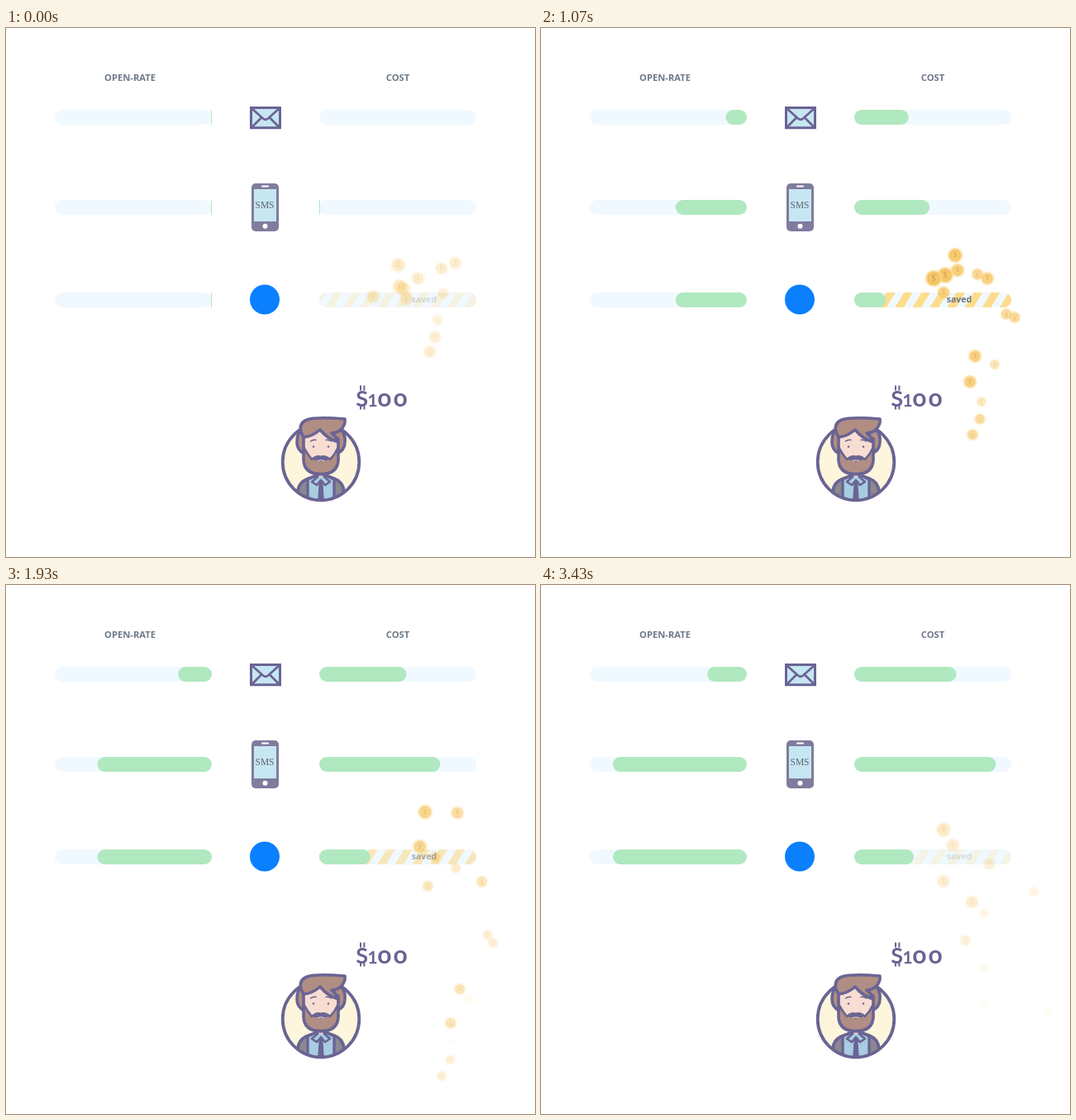
These frames come from a looping animation (640x640 px, 3460 ms). An HTML page with a canvas:

```html
<!DOCTYPE html>
<html lang="en">
<head>
<meta charset="utf-8">
<title>Open rate and cost</title>
<style>
  html, body { margin: 0; width: 100%; height: 100%; overflow: hidden; background: #fff; }
  canvas { display: block; width: 640px; height: 640px; }
</style>
</head>
<body>
<canvas id="stage" width="640" height="640"></canvas>
<script>
const ctx = document.getElementById('stage').getContext('2d');
const LOOP = 3460;
const INK = '#6a6494', BLUE = '#c6e7f1', TRACK = '#f0f9ff', GREEN = '#b0e8bf';
const HAIR = '#b18e83', SKIN = '#f8ddd2', GREY = '#8a8890', SHIRT = '#a8cce1';
const BAR_W = 190, BAR_H = 18, LEFT_END = 249, RIGHT_START = 379;

// top, open-rate share, cost share
const ROWS = [[99, 0.252, 0.65], [208, 0.853, 0.902], [320, 0.853, 0.379]];

// Bursts of coins: time of the listed state, birth time, rows of [x, y, vx, vy, strength]
const BURSTS = [
  [1070, -1e4, [
    [522, 492, 7, 109, .4], [531, 473, 9, 108, .35], [533, 452, 8, 108, .2],
    [549, 407, 15, 98, .25], [519, 428, 26, 109, .6], [525, 397, 33, 95, .6],
    [563, 346, 27, 75, .4], [573, 350, 22, 83, .4], [528, 298, 22, 30, .45],
    [540, 303, 49, 46, .6], [504, 293, 21, 19, .65], [487, 320, 32, 30, .55]]],
  [1070, 820, [
    [501, 275, 62, -30, .8], [489, 299, 16, -7, .95], [475, 303, 44, -70, 1]]],
  [2270, 1950, [
    [501, 297, 38, 65, .55], [472, 306, 16, 14, .9], [490, 307, 34, 40, .9]]],
  [3430, 3050, [[487, 296, 25, -10, .9], [498, 315, 20, 15, .7]]]
];

function ease(p) {
  let lo = 0, hi = 1;
  const bez = (s, a, b) => 3 * (1 - s) * (1 - s) * s * a + 3 * (1 - s) * s * s * b + s * s * s;
  for (let i = 0; i < 24; i++) {
    const mid = (lo + hi) / 2;
    if (bez(mid, .25, .25) < p) lo = mid; else hi = mid;
  }
  return bez(lo, .1, 1);
}

function paint(fill, stroke, width) {
  if (fill) { ctx.fillStyle = fill; ctx.fill(); }
  if (stroke) { ctx.strokeStyle = stroke; ctx.lineWidth = width; ctx.stroke(); }
}

function pill(x, y, w, h, r, fill, stroke, width) {
  ctx.beginPath();
  ctx.roundRect(x, y, w, h, Math.min(r, w / 2));
  paint(fill, stroke, width);
}

function disc(x, y, r, fill, stroke, width) {
  ctx.beginPath();
  ctx.arc(x, y, r, 0, 2 * Math.PI);
  paint(fill, stroke, width);
}

function shape(d, fill, stroke, width) {
  const path = new Path2D(d);
  if (fill) { ctx.fillStyle = fill; ctx.fill(path); }
  if (stroke) { ctx.strokeStyle = stroke; ctx.lineWidth = width; ctx.stroke(path); }
}

function label(text, x, y, font, color, align = 'center') {
  ctx.font = font;
  ctx.fillStyle = color;
  ctx.textAlign = align;
  ctx.fillText(text, x, y);
}

function stripes(alpha) {
  const top = ROWS[2][0], lean = 11, width = 10.5;
  ctx.save();
  ctx.globalAlpha = alpha;
  ctx.beginPath();
  ctx.roundRect(RIGHT_START, top, BAR_W, BAR_H, 9);
  ctx.clip();
  ctx.beginPath();
  for (let x = 365; x < 580; x += 21.1) {
    ctx.moveTo(x, top + BAR_H);
    ctx.lineTo(x + lean, top);
    ctx.lineTo(x + lean + width, top);
    ctx.lineTo(x + width, top + BAR_H);
    ctx.closePath();
  }
  paint('#fedc8c');
  ctx.restore();
}

function bars(t, glow) {
  const grown = ease(t / LOOP) * BAR_W;
  for (const [y] of ROWS) {
    pill(59, y, BAR_W, BAR_H, 9, TRACK);
    pill(RIGHT_START, y, BAR_W, BAR_H, 9, TRACK);
  }
  stripes(glow);
  for (const [y, rate, cost] of ROWS) {
    const open = Math.max(1, grown * rate);
    const paid = Math.max(cost > .8 ? 1 : 0, grown * cost);
    pill(LEFT_END - open, y, open, BAR_H, 9, GREEN);
    if (paid > 0) pill(RIGHT_START, y, paid, BAR_H, 9, GREEN);
  }
}

function coin(x, y, strength, alpha) {
  const r = 6 + 4 * strength;
  ctx.globalAlpha = alpha * .4;
  disc(x, y, r + .8, '#fde3a6');
  ctx.globalAlpha = alpha;
  disc(x, y, r - .6, '#fbd27a');
  disc(x, y, r * .64, '#f9cb6c', '#ecb65a', 1.1);
  label('$', x, y + r * .34, `bold ${r}px "Open Sans", sans-serif`, '#dfa750');
}

function coins(t, glow) {
  const drag = .4, fallSpeed = 170;
  ctx.save();
  for (const [at, born, list] of BURSTS) {
    const fadeIn = Math.min(1, (t - born) / 200);
    if (fadeIn <= 0) continue;
    const dt = (t - at) / 1000;
    const slowed = (1 - Math.exp(-drag * dt)) / drag;
    for (const [x, y, vx, vy, start] of list) {
      const strength = Math.min(1, start - .2 * dt);
      if (strength <= 0) continue;
      coin(x + vx * slowed, y + fallSpeed * dt + (vy - fallSpeed) * slowed,
        strength, strength * fadeIn * glow);
    }
  }
  ctx.restore();
}

function envelope() {
  ctx.lineJoin = 'miter';
  shape('M296.5 96.5H331.5V120.8H296.5Z', BLUE, INK, 3);
  ctx.lineJoin = 'round';
  shape('M297 97L311 109.5Q314 112 317 109.5L331 97M297 120.5L309 108.5M331 120.5L319 108.5', null, INK, 2.7);
}

function phone() {
  pill(297, 188, 33, 58, 5, '#7f7c9e');
  ctx.fillStyle = BLUE;
  ctx.fillRect(300, 195, 27, 39);
  pill(309, 190.6, 9, 1.8, 1, '#fff');
  disc(313.5, 239.7, 3, '#fff');
  label('SMS', 313, 218, '11.5px "Liberation Serif", serif', '#5f6276');
}

function avatar() {
  ctx.save();
  ctx.lineJoin = ctx.lineCap = 'round';
  disc(381, 525, 46.3, '#fdf5dc');
  ctx.save();
  ctx.beginPath();
  ctx.arc(381, 525, 46.3, 0, 2 * Math.PI);
  ctx.clip();
  shape('M353 576V561Q354 549 366 545L377 541H386L397 545Q408 549 409 561V576Z', GREY, INK, 3.6);
  shape('M365 576V546L377 541H386L397 546V576Z', SHIRT, INK, 3.4);
  shape('M377 537H385V543L381 547L377 543Z', SKIN, INK, 2.6);
  shape('M377 543L370 549L376 553L381 547L386 553L392 549L385 543', SHIRT, INK, 2.6);
  shape('M379.5 548H382.5L384 571L381 575L378 571Z', INK, INK, 1.5);
  ctx.restore();
  disc(381, 525, 46.3, null, INK, 3.8);

  shape('M360 484Q352 488 352 501Q352 511 361 515L365 490Z', HAIR, INK, 3.6);
  shape('M402 484Q411 488 410 501Q410 511 400 515L397 490Z', HAIR, INK, 3.6);
  shape('M360 493Q374 490 381 485Q390 492 402 497V523Q401 540 381 540Q361 540 360 523Z', SKIN, INK, 3.6);
  shape('M360.5 508Q365 516 370 522Q376 517 381 519Q386 517 392 522Q398 516 401.5 508V523Q400 539 381 539Q362 539 360.5 523Z', HAIR, INK, 2.6);
  shape('M373 522Q381 516 389 522Q381 526 373 522Z', INK, INK, 1);
  shape('M377 523.5Q381 522 385 523.5', null, SKIN, 1);
  shape('M357 489Q354 478 364 474Q375 470 410 473Q411 480 405 486Q400 490 394 490Q399 494 402 501Q389 497 380 486Q371 494 360 495Z', HAIR, INK, 3.6);
  shape('M368.5 500Q371 497.8 375 498.4M387 498.4Q391 497.8 393.5 500', null, INK, 1.5);
  disc(372, 506.5, 1.2, INK);
  disc(390, 506.5, 1.2, INK);
  ctx.restore();
}

function amount() {
  const face = 'px Lato, sans-serif';
  label('S', 430.6, 457.5, 'bold 27' + face, INK);
  ctx.fillStyle = INK;
  for (const x of [428, 432.4]) {
    ctx.fillRect(x, 432.5, 2, 6);
    ctx.fillRect(x, 456, 2, 5.5);
  }
  label('1', 443.6, 458, 'bold 21.5' + face, INK);
  // Old-style zeros sit at x-height.
  label('o', 457.8, 458, 'bold 30' + face, INK);
  label('o', 477, 458, 'bold 30' + face, INK);
}

function draw(t) {
  ctx.fillStyle = '#fff';
  ctx.fillRect(0, 0, 640, 640);
  const heading = 'bold 11.2px "Open Sans", sans-serif';
  label('OPEN-RATE', 150, 64, heading, '#6d7988');
  label('COST', 474, 64, heading, '#6d7988');

  const glow = .5 + .5 * Math.cos(2 * Math.PI * (t - 1160) / LOOP);
  bars(t, glow);
  coins(t, glow);
  ctx.globalAlpha = glow;
  label('saved', 506, 332, 'bold 10.5px "Open Sans", sans-serif', '#6d7580');
  ctx.globalAlpha = 1;

  envelope();
  phone();
  disc(313, 328.5, 18, '#0a80ff');
  amount();
  avatar();
}

function tick() {
  draw(performance.now() % LOOP);
  requestAnimationFrame(tick);
}
tick();
</script>
</body>
</html>
```
